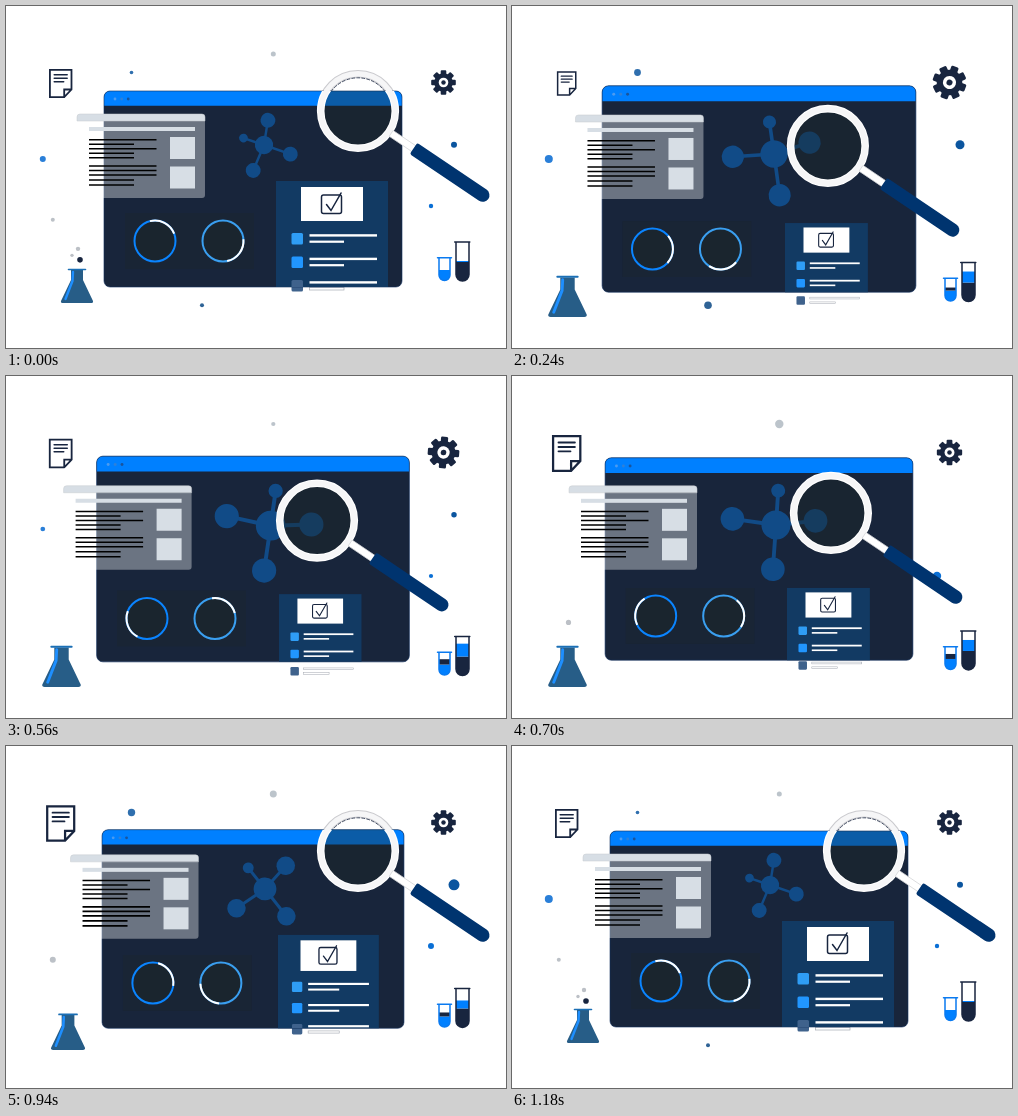
Recreate the animation shown at these times as an HTML page. Size 500 by 342 pixels, loop 1.2 s.

```html
<!DOCTYPE html>
<html lang="en">
<head>
<meta charset="utf-8">
<title>Research dashboard</title>
<style>
  html, body { margin: 0; width: 100%; height: 100%; overflow: hidden; background: #fff; }
  svg { display: block; width: 100vw; height: 100vh; }
  .line { fill: none; stroke-linecap: round; }
  .navy { fill: #18253f; }
  .blue { fill: #0080ff; }
  .tint { fill: #1c2625; }
  .pale { fill: #d7dee5; }
  .mol { fill: #114b87; stroke: #114b87; }
</style>
</head>
<body>
<svg viewBox="0 0 500 342" xmlns="http://www.w3.org/2000/svg">
  <defs>
    <clipPath id="winClip"><rect id="clipRect" x="98" y="85" width="298" height="196" rx="6"/></clipPath>
    <clipPath id="tubeA"><path d="M433 251V269a5.5 5.5 0 0 0 11 0V251Z"/></clipPath>
    <clipPath id="tubeB"><path d="M450 236V268.5a6.5 6.5 0 0 0 13 0V236Z"/></clipPath>
  </defs>

  <g id="dots"></g>

  <!-- parts that show only outside the window -->
  <g id="lensBack" class="line">
    <circle r="37.3" stroke="#cacace" stroke-width="7.6"/>
    <circle r="33.2" stroke="#18253f" stroke-width=".8" stroke-dasharray="3 2"/>
  </g>
  <g id="panelBack">
    <rect x="15.5" y="99" width="11.5" height="11.5" rx="1.5" fill="#3f628c"/>
    <g fill="#fff" stroke="#a4a9b2" stroke-width=".7">
      <rect x="33.5" y="100.2" width="67.5" height="2.4"/>
      <rect x="33.5" y="106.6" width="34.5" height="2.4"/>
    </g>
  </g>

  <g id="win">
    <rect x="98" y="85" width="298" height="196" rx="6" fill="#18253b"/>
    <path class="blue" d="M98 99.7V91a6 6 0 0 1 6-6H390a6 6 0 0 1 6 6V99.7Z"/>
    <rect x="98" y="85" width="298" height="196" rx="6" fill="none" stroke="#12305f" stroke-width=".6"/>
    <circle cx="109" cy="93" r="1.4" fill="#4d9bf0"/>
    <circle cx="115.7" cy="93" r="1.4" fill="#2f80d8"/>
    <circle cx="122.2" cy="93" r="1.4" fill="#1a549c"/>
  </g>

  <g id="rings">
    <rect class="tint" x="119" y="207" width="129" height="56" opacity=".25"/>
    <g transform="translate(149 235)">
      <circle class="tint" r="20" opacity=".4"/>
      <circle class="line" r="20.5" stroke="#0a84ff" stroke-width="2"/>
      <circle id="arcA" class="line" r="20.5" stroke="#fff" stroke-width="2" pathLength="100" stroke-dasharray="23 77" style="stroke-linecap:butt"/>
    </g>
    <g transform="translate(217 235)">
      <circle class="tint" r="20" opacity=".4"/>
      <circle class="line" r="20.5" stroke="#3a9ff0" stroke-width="2"/>
      <circle id="arcB" class="line" r="20.5" stroke="#fff" stroke-width="2" pathLength="100" stroke-dasharray="23 77" style="stroke-linecap:butt"/>
    </g>
  </g>

  <g id="card">
    <path d="M71 115H199V189a3 3 0 0 1-3 3H74a3 3 0 0 1-3-3Z" fill="#fff" opacity=".36"/>
    <path class="pale" d="M71 115V111a3 3 0 0 1 3-3H196a3 3 0 0 1 3 3V115Z" stroke="#c6cace" stroke-width=".5"/>
    <rect class="pale" x="83" y="121" width="106" height="4"/>
    <rect class="pale" x="164" y="131" width="25" height="22"/>
    <rect class="pale" x="164" y="160.5" width="25" height="22"/>
    <path class="line" stroke="#000" stroke-width="1.6" style="stroke-linecap:butt"
      d="M83 133.7H150.500M83 138.200H128M83 142.700H150.500M83 147.200H128M83 151.700H128
         M83 160H150.500M83 164.500H150.500M83 169H150.500M83 174H128M83 179H128"/>
  </g>

  <g id="mol" class="mol">
    <path d="M0 0L41 0M0 0L-8 45M0 0L-44 -11M0 0L6 -35" stroke-width="4"/>
    <g stroke="none">
      <circle r="15"/>
      <circle cx="41" r="12.2"/>
      <circle cx="-8" cy="45" r="12.2"/>
      <circle cx="-44" cy="-11" r="12.2"/>
      <circle cx="6" cy="-35" r="7.2"/>
    </g>
  </g>

  <g clip-path="url(#winClip)">
    <g id="panel">
      <rect width="112" height="130" fill="#123a63"/>
      <rect x="25" y="6" width="62" height="34" fill="#fff"/>
      <g class="line" stroke="#18253f" stroke-width="1.5">
        <rect x="45.500" y="14" width="20" height="18.500" rx="2"/>
        <path d="M50.500 23.500L55 29.500L65 12"/>
      </g>
      <g id="rows"></g>
    </g>
  </g>

  <g id="flask">
    <path d="M-6 -33V-23L-16 -2Q-16.500 0 -14 0H14Q16.500 0 16 -2L6 -23V-33Z" fill="#275d87"/>
    <path class="line" d="M-8.500 -33.500H8.500" stroke="#1b6fb5" stroke-width="1.6"/>
    <path class="line" d="M-4 -31L-4.500 -22L-11.500 -4" stroke="#1e8fff" stroke-width="2.4"/>
  </g>
  <g id="bubbles"></g>

  <g id="tubes">
    <g clip-path="url(#tubeA)">
      <rect class="blue" x="432" y="264" width="14" height="13"/>
      <rect id="levelA" class="navy" x="432" width="14"/>
    </g>
    <g clip-path="url(#tubeB)">
      <rect class="navy" x="449" y="256" width="15" height="21"/>
      <rect id="levelB" class="blue" x="449" width="15"/>
    </g>
    <path class="line" d="M431.500 251.700H445.500M433 252V269a5.500 5.500 0 0 0 11 0V252" stroke="#0a7af0" stroke-width="1.500"/>
    <path class="line" d="M448.700 236H463.800M450 236V268.500a6.500 6.500 0 0 0 13 0V236" stroke="#18253f" stroke-width="1.500"/>
  </g>

  <g id="doc" class="line" stroke="#18253f" stroke-width="1.8">
    <path d="M-10.800 -13.700H10.800V6L3.500 13.700H-10.800ZM10.800 6H3.500V13.700"/>
    <path d="M-6.500 -8.700H6.500M-6.500 -5.200H6.500M-6.500 -1.700H3" stroke-width="1.500"/>
  </g>

  <g id="gear" class="navy">
    <g id="teeth"></g>
    <circle r="9.300"/>
    <circle r="4.800" fill="#fff"/>
    <circle r="2.200"/>
  </g>

  <g clip-path="url(#winClip)">
    <g id="lensIn">
      <circle class="tint" r="34.500" opacity=".4"/>
      <circle class="line" r="37.300" stroke="#fff" stroke-width="7.600"/>
    </g>
  </g>
  <g id="lens">
    <circle class="line" r="37.300" stroke="#f6f6f7" stroke-width="5.400"/>
    <g transform="rotate(34)">
      <rect x="40" y="-3.500" width="30" height="7" fill="#fff" stroke="#d2d3d6" stroke-width=".7"/>
      <path d="M69 -6.700H150.500a6.700 6.700 0 0 1 0 13.400H69a2 2 0 0 1-2-2V-4.700a2 2 0 0 1 2-2Z" fill="#00346f"/>
    </g>
  </g>
</svg>
<script>
const LOOP = 1200;
const TIMES = [0, 80, 240, 420, 700, 940, 1180];
const SEGS = TIMES.length - 1;
const $ = id => document.getElementById(id);

function add(parent, tag, attrs) {
  const el = document.createElementNS('http://www.w3.org/2000/svg', tag);
  for (const k in attrs) el.setAttribute(k, attrs[k]);
  return $(parent).appendChild(el);
}

// Smooth periodic curve through the values at TIMES, without overshoot.
function track(...v) {
  if (v.length === SEGS) v.push(v[0]);
  const rate = i => (v[i + 1] - v[i]) / (TIMES[i + 1] - TIMES[i]);
  const slope = TIMES.map((_, i) => {
    const a = rate((i + SEGS - 1) % SEGS), b = rate(i % SEGS);
    return a * b > 0 ? 2 * a * b / (a + b) : 0;
  });
  return t => {
    if (t >= TIMES[SEGS]) return v[SEGS];
    let i = 0;
    while (t >= TIMES[i + 1]) i++;
    const h = TIMES[i + 1] - TIMES[i], u = (t - TIMES[i]) / h, w = 1 - u;
    return w * w * ((1 + 2 * u) * v[i] + u * h * slope[i])
         + u * u * ((1 + 2 * w) * v[i + 1] - w * h * slope[i + 1]);
  };
}

const grow = track(0, .33, .88, 1, .55, .22);
const sweep = track(0, .285, .81, 1, .745, 0);
const ringY = track(0, 2, 8, 9, 5, 2);
const arcA = track(25, 200, 450, 570, 645, 775, 1105);
const arcB = track(125, 225, 530, 700, 800, 945, 1205);
const cardX = track(0, -2, -7.5, -12, -14, -6.5);
const mol = {
  x: track(258, 259, 262, 265, 264, 259),
  y: track(139, 142, 148, 150, 149, 143),
  turn: track(-81, -61, -18, 0, -6, -48),
  size: track(.61, .71, .91, 1, .97, .76)
};
const panel = {
  x: track(270, 272, 273, 271, 275, 272),
  y: track(175, 190, 217, 221, 212, 189),
  size: track(1, .895, .74, .735, .74, .9)
};
const flask = {
  x: track(71, 63, 55.5, 55.5, 55.5, 62),
  y: track(297, 303, 311, 311, 311, 304),
  size: track(1, 1.02, 1.2, 1.2, 1.2, 1.06)
};
const tubeY = track(0, 7.5, 20.5, 27.5, 19, 6.5);
const levelA = track(0, 1, 3, 5.5, 5, 4);
const levelB = track(1, 4, 11, 14, 11, 8);
const docSize = track(1, .94, .84, .76, 1.26, 1.25);
const gearSize = track(1, 1.02, 1.37, 1.52, 1.03, 1);
const gearTurn = track(0, 2, 20, 12, 0, 0);

const dots = [
  [125.5, 66.5, '#2f6fae', track(1.8, 2.7, 3.4, 0, 0, 3.7)],
  [267.3, 48, '#bcc4cb', track(2.5, 4.8, 0, 0, 4.2, 3.5)],
  [36.8, 153, '#2a7fd8', track(3, 3.4, 4, 4.8, 0, 0, 4)],
  [448, 138.800, '#0b559f', track(3, 3.5, 4.5, 5.5, 0, 5.5)],
  [425, 200, '#0a6fd5', track(2.2, 2, 0, 0, 4.2, 3)],
  [196, 299.3, '#2f6396', track(2, 2.8, 3.8, 0, 0, 0)],
  [46.8, 213.700, '#bcc1c7', track(2, 3, 0, 0, 0, 3)]
].map(([cx, cy, fill, size]) => ({ el: add('dots', 'circle', { cx, cy, fill }), size }));

// Bubbles: place and size at their peak time, lifetime to either side.
const bubbles = [
  [74, 254.5, 2.8, 1190, 70, '#18253f'],
  [72, 243.5, 2.2, 1190, 70, '#bcc0c6'],
  [66, 250, 1.7, 1190, 70, '#bcc0c6'],
  [59, 259.5, 3.6, 420, 90, '#18253f'],
  [48, 254, 2, 420, 80, '#bcc0c6'],
  [56.5, 246.5, 2.6, 700, 100, '#bcc0c6']
].map(([cx, y, r, peak, life, fill]) => ({ el: add('bubbles', 'circle', { cx, fill }), y, r, peak, life }));

for (let i = 0; i < 4; i++)
  add('teeth', 'rect', { x: -2.8, y: -12.3, width: 5.6, height: 24.6, rx: 1, transform: `rotate(${i * 45})` });

['#2f9df5', '#2196ff', '#3f628c'].forEach((fill, i) => {
  const y = 52 + i * 23.5;
  add('rows', 'rect', { x: 15.5, y, width: 11.5, height: 11.5, rx: 1.5, fill });
  add('rows', 'rect', { x: 33.5, y: y + 1.2, width: 67.5, height: 2.4, fill: '#fff' });
  add('rows', 'rect', { x: 33.5, y: y + 7.6, width: 34.5, height: 2.2, fill: '#fff' });
});

const place = (ids, x, y, size = 1, turn = 0) => ids.split(' ').forEach(id =>
  $(id).setAttribute('transform', `translate(${x} ${y}) rotate(${turn}) scale(${size})`));

function level(id, base, h) {
  $(id).setAttribute('y', base - h);
  $(id).setAttribute('height', h);
}

function draw(t) {
  const g = grow(t), s = 1 + .06 * g, l = sweep(t), cx = cardX(t);
  place('win clipRect', 247 * (1 - s), 183 * (1 - s), s);
  place('lens lensIn lensBack', 352 - 44.5 * l, 105 + 43 * l);
  place('rings', -9.7 * g, ringY(t));
  place('arcA', 0, 0, 1, arcA(t) - 131);
  place('arcB', 0, 0, 1, arcB(t) - 131);
  place('card', cx, -.13 * cx);
  place('mol', mol.x(t), mol.y(t), mol.size(t), mol.turn(t));
  place('panel panelBack', panel.x(t), panel.y(t), panel.size(t));
  place('flask', flask.x(t), flask.y(t), flask.size(t));
  place('tubes', 0, tubeY(t));
  level('levelA', 264, levelA(t));
  level('levelB', 256, levelB(t));
  place('doc', 54.7, 77.5, docSize(t));
  place('gear', 437.5, 76.5, gearSize(t), gearTurn(t));
  for (const d of dots) d.el.setAttribute('r', d.size(t));
  for (const b of bubbles) {
    const dt = (t - b.peak + LOOP * 1.5) % LOOP - LOOP / 2;
    const fade = Math.min(1, 2 * (1 - Math.abs(dt) / b.life));
    b.el.setAttribute('cy', b.y - dt * .06);
    b.el.setAttribute('r', b.r * Math.max(0, fade));
  }
}

function frame() {
  draw(performance.now() % LOOP);
  requestAnimationFrame(frame);
}
frame();
</script>
</body>
</html>
```
